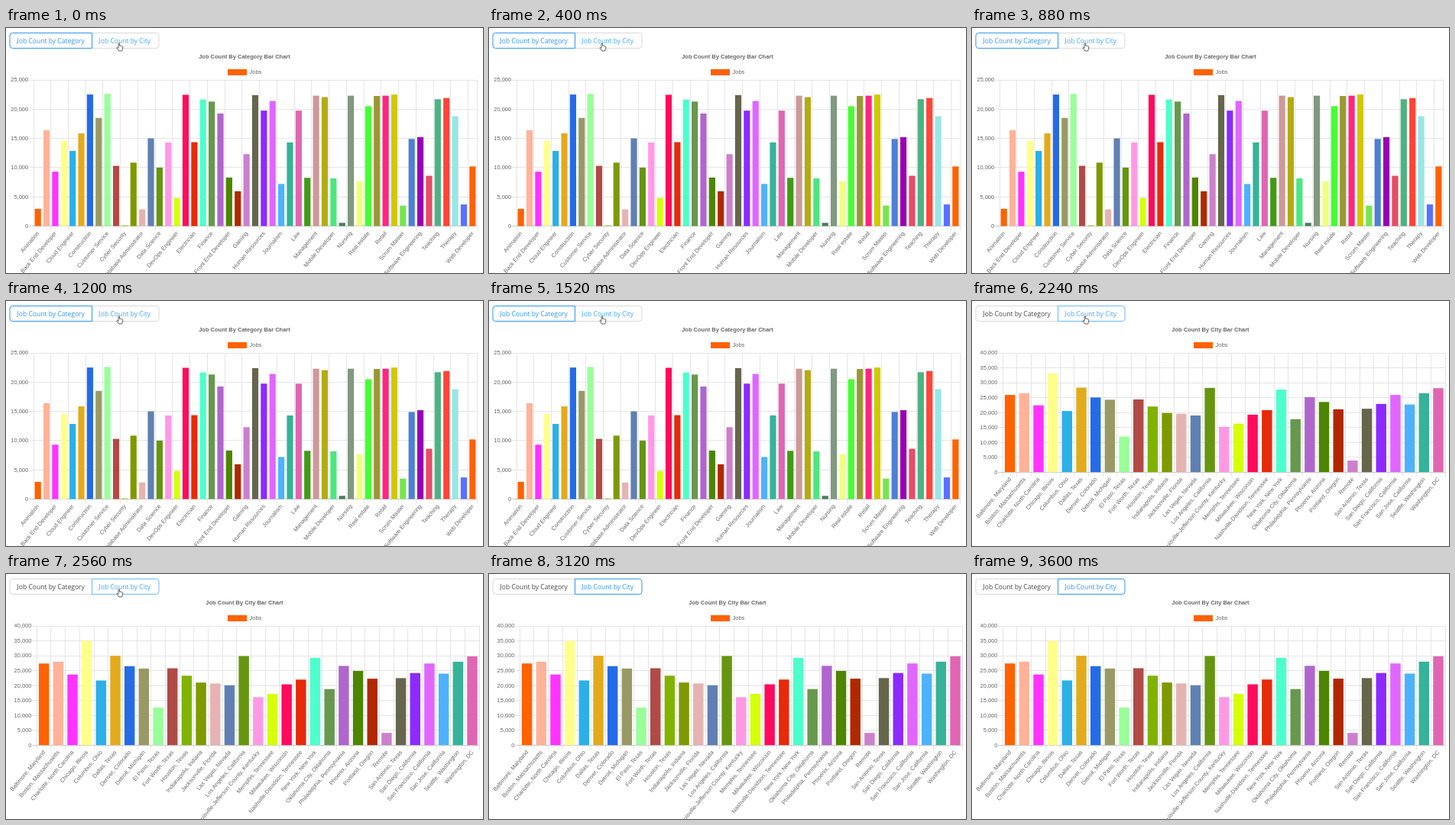
An HTML page that plays this animation: 624x321 px, repeating every 3.68 s.

```html
<!DOCTYPE html>
<html lang="en">
<head>
<meta charset="utf-8">
<title>Job Count</title>
<style>
  html, body { margin: 0; width: 100%; height: 100%; overflow: hidden; background: #fff; }
  svg { display: block; width: 624px; height: 321px; }
  text { font: 7.5px "Liberation Sans", Arial, sans-serif; fill: #666; }
  .title { font-weight: bold; text-anchor: middle; }
  .end { text-anchor: end; }
  .grid { stroke: #e3e3e3; stroke-width: .9; }
  .zero { stroke: #c6c6c6; }
  .btn path { fill: #fff; stroke: #d9d9d9; }
  .btn text { font: 8.55px "Open Sans", "Noto Sans", sans-serif; fill: #484848; }
  .btn.hover text { fill: #40a9ff; }
  .btn.on path { stroke: #2f97f5; }
  .btn.on text { fill: #2f97f5; }
  .btn.on.hover path { stroke: #69b9fb; }
  .btn.on.hover text { fill: #40a9ff; }
</style>
</head>
<body>
<svg id="stage" viewBox="0 0 624 321">
  <g id="charts"></g>
  <g id="cityBtn" class="btn">
    <path d="M112.5 6.5H196.5a3.5 3.5 0 0 1 3.5 3.5V23a3.5 3.5 0 0 1-3.5 3.5H112.5z"/>
    <text x="121.5" y="20">Job Count by City</text>
  </g>
  <g id="catBtn" class="btn">
    <path d="M112.5 6.5H8.5a3.5 3.5 0 0 0-3.5 3.5V23a3.5 3.5 0 0 0 3.5 3.5H112.5z"/>
    <text x="14.5" y="20">Job Count by Category</text>
  </g>
  <path id="hand" fill="#fff" stroke="#333" stroke-width=".8" stroke-linejoin="round"
    d="M147 26.500V20.300q.8-1.100 1.600 0V23.300q.9-.6 1.500.2q.9-.5 1.400.3q1-.3 1.200.6V27.200L151.600 30H147.600L145 26.300q.2-1.200 1.200-.6z"/>
</svg>
<script>
const LOOP = 3680, STEP = 80, SWITCH = 1760, GROW_FROM = 1724, GROW = 1000, LEAVE = 2880;
const TOP = 68;

const colors = `ff6200 ffb399 ff33ff ffff8c 2bb0e8 e3aa1c 246be8 999966 99ff99 b04a46
  80b300 7f9900 e6b3b3 6080b3 66960f ff99e6 d6ff0a ff0a5c e62a0a 4dffcc
  66994d b066cc 4d8500 b02800 cc80cc 66664d 8c2aff e066ff 4db3ff 36b399
  e066b3 419a14 cc9999 b3ab14 4de680 4d7a60 809980 f0ff80 46ff33 999933
  ff2680 d2c800 76e64d 4d80d6 9900b3 e64d66 4db380 ff4438 99e6e6 5a70ff`.split(/\s+/);

const category = {
  title: "Job Count By Category Bar Chart",
  left: 36, right: 616, base: 259.5, max: 25, skip: 2,
  labels: `Animation|Back End Developer|Cloud Engineer|Construction|Customer Service|Cyber Security|
    Database Administrator|Data Science|DevOps Engineer|Electrician|Finance|Front End Developer|Gaming|
    Human Resources|Journalism|Law|Management|Mobile Developer|Nursing|Real estate|Retail|Scrum Master|
    Software Engineering|Teaching|Therapy|Web Developer`,
  values: [2.95, 16.4, 9.3, 14.55, 12.85, 15.85, 22.5, 18.5, 22.6, 10.3, .1, 10.85, 2.85, 15, 10, 14.3, 4.8,
    22.45, 14.35, 21.65, 21.3, 19.25, 8.3, 5.95, 12.3, 22.4, 19.75, 21.4, 7.2, 14.3, 19.75, 8.25, 22.3,
    22.05, 8.15, .55, 22.3, 7.65, 20.5, 22.25, 22.3, 22.5, 3.5, 14.9, 15.2, 8.6, 21.7, 21.9, 18.8, 3.7, 10.2]
};

const city = {
  title: "Job Count By City Bar Chart",
  left: 40.3, right: 619.3, base: 224.2, max: 40, skip: 1,
  labels: `Baltimore, Maryland|Boston, Massachusetts|Charlotte, North Carolina|Chicago, Illinois|Columbus, Ohio|
    Dallas, Texas|Denver, Colorado|Detroit, Michigan|El Paso, Texas|Fort Worth, Texas|Houston, Texas|
    Indianapolis, Indiana|Jacksonville, Florida|Las Vegas, Nevada|Los Angeles, California|
    Louisville-Jefferson County, Kentucky|Memphis, Tennessee|Milwaukee, Wisconsin|
    Nashville-Davidson, Tennessee|New York, New York|Oklahoma City, Oklahoma|
    Philadelphia, Pennsylvania|Phoenix, Arizona|Portland, Oregon|Remote|San Antonio, Texas|
    San Diego, California|San Francisco, California|San Jose, California|Seattle, Washington|Washington, DC`,
  values: [27.4, 28, 23.7, 35, 21.7, 30, 26.5, 25.7, 12.6, 25.8, 23.3, 21, 20.7, 20.1, 29.9, 16.1, 17.2,
    20.4, 22, 29.3, 18.8, 26.6, 24.9, 22.3, 4.1, 22.5, 24.2, 27.4, 24, 28, 29.8]
};

const $ = id => document.getElementById(id);

function add(parent, tag, attrs = {}, text = "") {
  const el = document.createElementNS("http://www.w3.org/2000/svg", tag);
  for (const key in attrs) el.setAttribute(key, attrs[key]);
  el.textContent = text;
  return parent.appendChild(el);
}

function line(parent, x1, y1, x2, y2, cls = "") {
  add(parent, "line", { x1, y1, x2, y2, class: "grid " + cls });
}

function buildChart({ title, left, right, base, max, skip, labels, values }) {
  const root = add($("charts"), "g");
  const slot = (right - left) / values.length;
  const crisp = v => Math.floor(v) + .5;

  add(root, "text", { x: 312, y: 39.5, class: "title" }, title);
  add(root, "rect", { x: 290, y: 54, width: 25, height: 8, fill: "#" + colors[0] });
  add(root, "text", { x: 318.5, y: 60.3 }, "Jobs");

  for (let i = 0; i <= values.length; i += skip) {
    const x = crisp(left + i * slot);
    line(root, x, TOP, x, base + 6);
  }
  line(root, crisp(right), TOP, crisp(right), base + 6);

  for (let v = 0; v <= max; v += 5) {
    const y = base - v / max * (base - TOP);
    line(root, left - 6, crisp(y), right, crisp(y), v ? "" : "zero");
    add(root, "text", { x: left - 6.8, y: y + 2.4, class: "end" }, v ? v + ",000" : "0");
  }

  const bars = add(root, "g");
  const width = slot * .72;
  values.forEach((v, i) => {
    const height = v / max * (base - TOP);
    add(bars, "rect", {
      x: left + (i + .5) * slot - width / 2, y: base - height,
      width, height, fill: "#" + colors[i % colors.length]
    });
  });

  labels.split(/\|\s*/).forEach((name, i) => {
    const x = left + (i * skip + .5) * slot;
    add(root, "text", { y: 2.6, class: "end", transform: `translate(${x} ${base + 8}) rotate(-50)` }, name);
  });

  return {
    show: on => root.setAttribute("display", on ? "inline" : "none"),
    grow: k => bars.setAttribute("transform", `translate(0 ${base * (1 - k)}) scale(1 ${k})`)
  };
}

const catChart = buildChart(category);
const cityChart = buildChart(city);

const easeOutQuart = p => 1 - (1 - p) ** 4;

function draw(now) {
  const t = Math.floor(now % LOOP / STEP) * STEP;
  const picked = t >= SWITCH, hover = t < LEAVE;
  catChart.show(!picked);
  cityChart.show(picked);
  cityChart.grow(easeOutQuart(Math.min(1, Math.max(0, (t - GROW_FROM) / GROW))));

  $("catBtn").classList.toggle("on", !picked);
  $("cityBtn").classList.toggle("on", picked);
  $("cityBtn").classList.toggle("hover", hover);
  $("hand").setAttribute("display", hover ? "inline" : "none");
  // The selected button's border lies on top.
  const front = $(picked ? "cityBtn" : "catBtn");
  if (front.nextElementSibling !== $("hand")) $("stage").insertBefore(front, $("hand"));
}

function tick() {
  draw(performance.now());
  requestAnimationFrame(tick);
}
tick();
</script>
</body>
</html>
```
